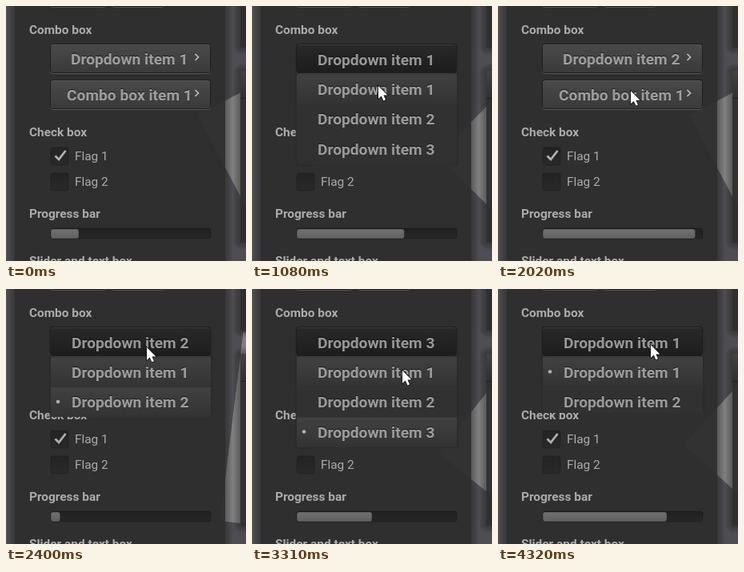
Animation of 300 by 319 pixels, one loop 4.41 s. Source, as an HTML page with a canvas:

```html
<!DOCTYPE html>
<html lang="en">
<head>
<meta charset="utf-8">
<title>Widget panel</title>
<style>
html, body { margin: 0; width: 100%; height: 100%; overflow: hidden; background: #4d4d52; }
canvas { display: block; width: 300px; height: 319px; }
</style>
</head>
<body>
<canvas id="stage" width="300" height="319"></canvas>
<script>
const ctx = document.getElementById('stage').getContext('2d');
const LOOP = 4410, STEPS = 57;
const FONT = 'Roboto, "Open Sans", sans-serif';
const BOLD = 'bold 15.4px ' + FONT, PLAIN = '15.4px ' + FONT, BIG = 'bold 19.2px ' + FONT;
const CLOSED = 84, OPEN = 199, ROW = 37.5;

// Key points are [step, value...]
const clockKeys = [[0, 1.67], [9, 5.2], [19, 8.18], [31, 10.49], [39, 12.27], [43, 14.65], [56, 17.73]];
const popupKeys = [[7, CLOSED], [9, 132], [11, OPEN], [22, OPEN], [26, CLOSED], [29, CLOSED],
  [31, 160], [32, OPEN], [35, OPEN], [38, CLOSED], [40, CLOSED], [43, OPEN], [53, OPEN], [56, 155]];
const mouseKeys = [[4, 168, 46], [8, 161, 60], [10, 161, 60], [14, 158, 100], [19, 153, 137],
  [22, 154, 139], [28, 172, 90], [31, 176, 73], [33, 177, 76], [36, 168, 168], [39, 161.5, 172.5],
  [41, 176, 80], [43, 188, 102], [53, 192, 98], [56, 191, 70]];

function along(keys, k, n = 1) {
  if (k <= keys[0][0]) return keys[0][n];
  for (let i = 1; i < keys.length; i++) {
    const a = keys[i - 1], b = keys[i];
    if (k <= b[0]) return a[n] + (b[n] - a[n]) * (k - a[0]) / (b[0] - a[0]);
  }
  return keys[keys.length - 1][n];
}

const gray = v => `rgb(${v},${v},${v})`;

function fade(y0, y1, top, bottom) {
  const g = ctx.createLinearGradient(0, y0, 0, y1);
  g.addColorStop(0, top);
  g.addColorStop(1, bottom);
  return g;
}

function rect(x, y, w, h, fill) {
  ctx.fillStyle = fill;
  ctx.fillRect(x, y, w, h);
}

function round(x, y, w, h, r, fill, stroke) {
  ctx.beginPath();
  ctx.roundRect(x, y, w, h, r);
  if (fill) { ctx.fillStyle = fill; ctx.fill(); }
  if (stroke) { ctx.strokeStyle = stroke; ctx.lineWidth = 1; ctx.stroke(); }
}

function line(points, color, width) {
  ctx.beginPath();
  points.forEach(p => ctx.lineTo(p[0], p[1]));
  ctx.strokeStyle = color;
  ctx.lineWidth = width;
  ctx.stroke();
}

function label(str, x, y, font = BOLD) {
  ctx.font = font;
  ctx.fillStyle = 'rgba(255,255,255,.6)';
  ctx.fillText(str, x, y);
}

function caption(str, x, y) {
  ctx.font = BIG;
  ctx.fillStyle = 'rgba(0,0,0,.6)';
  ctx.fillText(str, x, y - 1);
  ctx.fillStyle = 'rgba(255,255,255,.57)';
  ctx.fillText(str, x, y);
}

function square(clock) {
  const turn = clock + Math.PI / 4 + 22 * Math.PI / 180;
  ctx.beginPath();
  for (let i = 0; i < 4; i++) {
    const a = turn + i * Math.PI / 2;
    ctx.lineTo(400 + 168 * Math.cos(a), 186.5 - 168 * Math.sin(a));
  }
  ctx.fillStyle = '#808080';
  ctx.fill();
}

function pane(x, y, w, h) {
  for (let i = 9; i > 0; i--) {
    round(x - i, y - i, w + 2 * i, h + 2 * i, i + 2, 'rgba(0,0,0,.035)');
  }
  round(x, y, w, h, 2, 'rgba(46,46,46,.9)');
}

// A raised face: a light rim one pixel below a dark one
function face(x, y, w, h, top, bottom, rim) {
  round(x, y + 1, w, h, 3, fade(y, y + h, gray(top), gray(bottom)), gray(rim));
  round(x, y, w, h, 3, null, gray(29));
}

function button(y, str, x) {
  face(55.5, y - .5, 200, 36, 74, 58, 88);
  caption(str, x, y + 25);
  line([[236.5, y + 12], [240.5, y + 16], [236.5, y + 20]], 'rgba(255,255,255,.65)', 1.7);
}

function checkbox(y, str, on) {
  round(56, y, 22, 22, 3, fade(y, y + 22, gray(35), gray(41)), 'rgba(0,0,0,.2)');
  if (on) line([[61.5, y + 10.5], [66, y + 15], [74.5, y + 4]], gray(176), 2.8);
  label(str, 86, y + 16, PLAIN);
}

function progress(value) {
  round(56, 278, 200, 13, 3, fade(278, 291, gray(32), gray(39)), 'rgba(0,0,0,.2)');
  round(56, 279, 2 + 198 * value, 12, 3, fade(279, 291, gray(112), gray(96)), 'rgba(0,0,0,.25)');
}

function popup(bottom, head, chosen, mouseY) {
  const hover = Math.floor((mouseY - 85) / ROW);
  ctx.save();
  ctx.beginPath();
  ctx.rect(54, 47, 204, bottom - 47);
  ctx.clip();
  round(55, 48, 202, 151, 3, gray(49), gray(40));
  for (let i = 0; i < 3; i++) {
    const y = 85.5 + i * ROW;
    if (i === 0 || i === hover || i === chosen) {
      rect(56, y, 200, ROW, fade(y, y + ROW, gray(65), gray(51)));
    }
    caption('Dropdown item ' + (i + 1), 82, y + 25);
    if (i === chosen) {
      ctx.beginPath();
      ctx.arc(65, y + 18, 2.3, 0, 7);
      ctx.fillStyle = gray(175);
      ctx.fill();
    }
  }
  face(55.5, 47.5, 200, 36, 41, 29, 60);
  caption('Dropdown item ' + head, 82, 73.5);
  ctx.restore();
}

function pointer(x, y) {
  const shape = [[0, 0], [0, 16], [3.7, 12.6], [6.4, 18.5], [9, 17.3], [6.4, 11.6], [11.4, 11.4]];
  ctx.beginPath();
  shape.forEach(p => ctx.lineTo(x + p[0], y + p[1]));
  ctx.closePath();
  ctx.strokeStyle = '#111';
  ctx.lineWidth = 1.6;
  ctx.stroke();
  ctx.fillStyle = '#fff';
  ctx.fill();
}

function draw(k) {
  const clock = along(clockKeys, k);
  const bottom = along(popupKeys, k);
  const head = k < 22 ? 1 : k < 36 ? 2 : k < 54 ? 3 : 1;
  const mx = along(mouseKeys, k), my = along(mouseKeys, k, 2);

  rect(0, 0, 300, 319, '#4d4d52');
  square(clock);
  pane(293, -60, 60, 112);
  pane(293, 81, 60, 215);
  rect(293, 81, 7, 34, fade(81, 115, gray(66), gray(48)));
  rect(293, 115, 7, 1, gray(31));
  pane(11, -40, 263, 400);

  face(55.5, -35.5, 69, 36, 74, 58, 88);
  face(132.5, -35.5, 65, 36, 74, 58, 88);
  label('Combo box', 29, 35);
  label('Check box', 29, 163);
  label('Progress bar', 29, 265);
  label('Slider and text box', 29, 324);
  button(48, 'Dropdown item ' + head, 81);
  button(93, 'Combo box item 1', 76);
  checkbox(177, 'Flag 1', true);
  checkbox(209, 'Flag 2', false);
  progress(clock / 10 % 1);

  if (bottom > CLOSED) popup(bottom, head, k < 22 ? -1 : head - 1, my);
  if (k >= 4) pointer(mx, my);
}

const start = performance.now();
function tick() {
  const t = (performance.now() - start) % LOOP;
  draw(Math.min(STEPS - 1, Math.floor((t + 22) * STEPS / LOOP)));
  requestAnimationFrame(tick);
}
tick();
</script>
</body>
</html>
```
